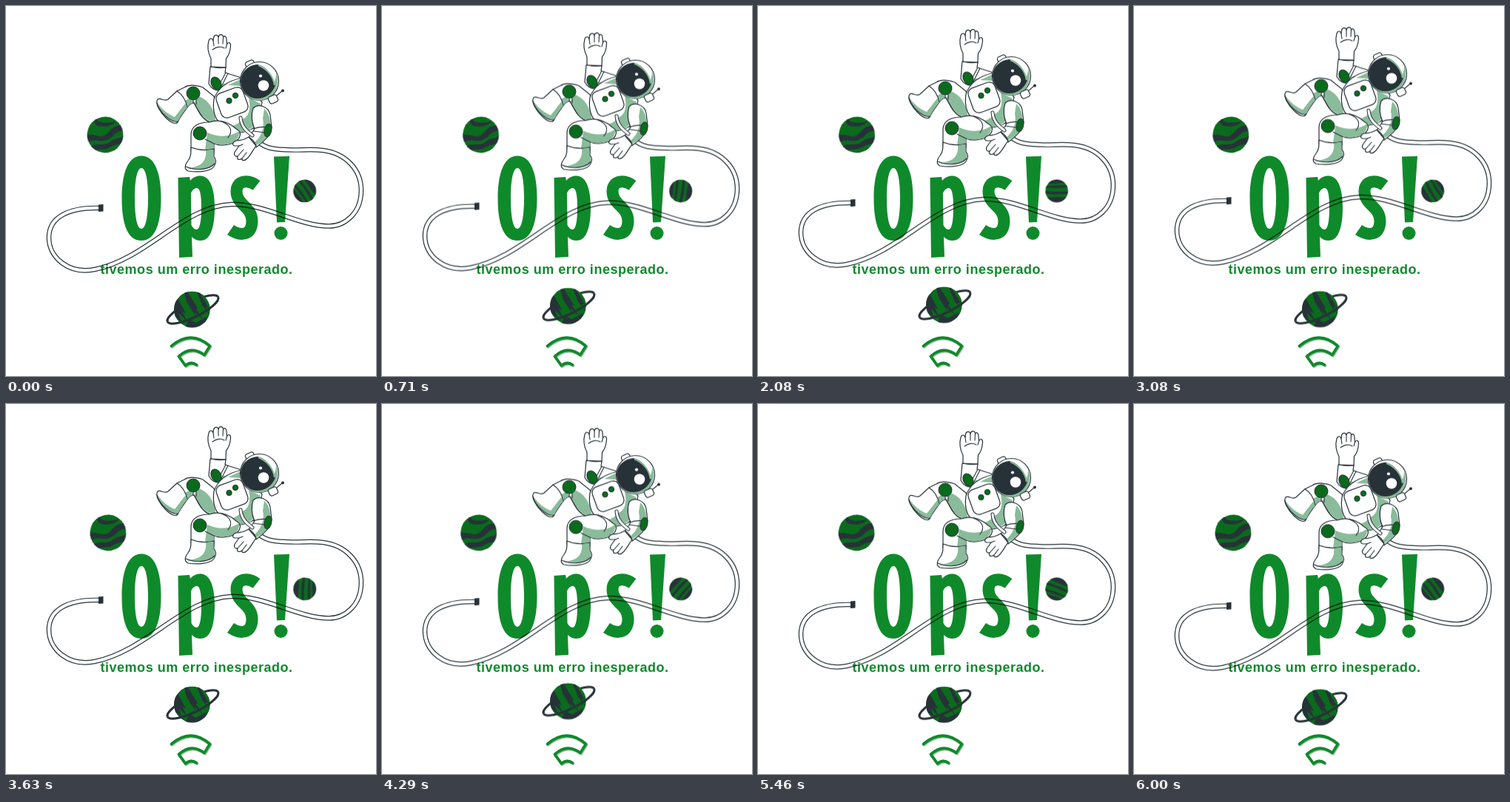
An HTML page that plays this animation: 500x500 px, repeating every 6.04 s.

```html
<!DOCTYPE html>
<html lang="pt">
<head>
<meta charset="utf-8">
<title>Ops!</title>
<style>
  html, body { margin: 0; width: 100%; height: 100%; overflow: hidden; background: #fff; }
  svg { display: block; width: 100vw; height: 100vh; background: #fff; }
  :root { --ink: #263238; --green: #0f8a2b; --deep: #0b6b1d; --shade: #8abb9a; --loop: 6040ms; }

  .float { animation: float var(--loop) linear infinite; }
  .bob { animation: float calc(var(--loop) / 2) linear infinite; }
  .spin { animation: spin var(--loop) linear infinite; }
  .shake { animation: shake var(--loop) linear infinite; }
  .blend { mix-blend-mode: multiply; }

  @keyframes float { 50% { transform: translateY(-10px); } }
  @keyframes spin { to { transform: rotate(360deg); } }
  @keyframes shake {
    10%, 90% { transform: translateX(-1px); }
    20%, 80% { transform: translateX(2px); }
    30%, 50%, 70% { transform: translateX(-4px); }
    40%, 60% { transform: translateX(4px); }
  }

  .suit { fill: #fff; stroke: var(--ink); stroke-width: 1.2; stroke-linejoin: round; stroke-linecap: round; }
  .line { fill: none; stroke: var(--ink); stroke-width: 1.1; stroke-linecap: round; stroke-linejoin: round; }
  .shade { fill: var(--shade); }
  .ink { fill: var(--ink); }
  .deep { fill: var(--deep); }
  .joint { fill: var(--deep); stroke: var(--ink); stroke-width: 1; }
  .title { fill: var(--green); }
  .ring { fill: none; stroke: var(--ink); stroke-width: 3.2; }
  .note { fill: var(--green); font: bold 18px "Liberation Sans", Arial, sans-serif; letter-spacing: .52px; }
</style>
</head>
<body>
<svg viewBox="0 0 500 500">
  <defs>
    <clipPath id="disc"><circle r="24.5"/></clipPath>
    <clipPath id="moon"><circle r="15.5"/></clipPath>
    <path id="hose" fill="none" d="M340 183C352 193 362 194 385 194.500C400 195 412 193 428 195C460 199 480 222 480 249C480 280 458 297.500 436 297.500C395 297 350 267 305 268C240 270 190 342 120 356C85 363 58 340 58 313C58 285 85 272 126 273"/>
    <path id="signal" fill="none" stroke-linejoin="round" stroke-linecap="round" d="M223.500 459.500Q250 437 275.500 459.500L268 471.500Q250 458 233.500 473.500L242.500 486Q250 479.500 257.500 485"/>
  </defs>

  <!-- lettering -->
  <g class="title" role="img" aria-label="Ops!">
    <path fill-rule="evenodd" d="M183 202.500C202 202.500 209.500 228 209.500 259C209.500 293 202 317 183 317C164 317 156.500 294 156.500 260C156.500 228 164 202.500 183 202.500ZM183 219C177 219 174 236 174 260C174 284 177 301 183 301C189 301 192 284 192 259C192 236 189 219 183 219Z"/>
    <path fill-rule="evenodd" d="M232.500 232L248 231L249 236C253 231 258 229.500 263 229.500C276 230 282 247 282 272C282 300 276 317 263 317C258 317 254 315 251 312L252 339L234 340ZM250 253L250.500 296C253 301 256 302 258 302C262 301 264 290 264 273C264 255 262 246 258 246C255 246 252 248 250 253Z"/>
    <path d="M338.500 242.500C328 234.500 311.500 235 311.500 250.500C311.500 269 332.500 271 332.500 290.500C332.500 311 316 311 303.500 302.500" fill="none" stroke="var(--green)" stroke-width="16"/>
    <path d="M362 203.500L383 203L377 292L366 292.500Z"/>
    <circle cx="371.500" cy="307" r="9"/>
  </g>
  <text class="note" x="127.500" y="361.500">tivemos um erro inesperado.</text>

  <!-- signal -->
  <use href="#signal" x="1" y="1.200" stroke="#9dbda5" stroke-width="3.800"/>
  <use href="#signal" stroke="var(--green)" stroke-width="3.800"/>

  <!-- striped planet -->
  <g transform="translate(134 174)">
    <g class="shake">
      <g clip-path="url(#disc)" transform="rotate(-20)">
        <circle class="deep" r="24.500"/>
        <path class="ink" d="M-4 -25C-3 -17 6 -14 20 -12C12 -7 3 -10 -4 -14C-9 -17 -8 -22 -6 -25Z"/>
        <path class="ink" d="M-26 -8C-13 -9 -9 4 2 0C11 -4 14 -8 26 -4L25 3C14 0 11 6 3 7C-9 10 -14 -2 -26 2Z"/>
        <path class="ink" d="M-26 8C-14 5 -8 15 4 11C13 8 16 13 25 9L22 18C13 20 10 16 2 18C-9 21 -14 13 -26 16Z"/>
      </g>
    </g>
  </g>

  <!-- small spinning planet -->
  <g transform="translate(403.700 250)">
    <g class="spin" clip-path="url(#moon)">
      <g transform="rotate(55)">
        <circle class="deep" r="15.500"/>
        <path class="ink" d="M-16 -16H16V-9L3 -8L-16 -9ZM-16 -4L4 -4.500L16 -3V0L-2 -1L-16 -1ZM-16 5L0 4L16 5V7L-16 8ZM-16 11L6 10L16 11V16H-16Z"/>
      </g>
    </g>
  </g>

  <!-- ringed planet -->
  <g class="bob">
    <g transform="translate(251.500 410)">
      <path class="ring" transform="translate(1 0) rotate(-26)" d="M-38 0A38 10.500 0 0 1 38 0"/>
      <g clip-path="url(#disc)">
        <circle class="deep" r="24.500"/>
        <path class="ink" d="M-26 -12L-19 -14L-8 6L-13 3L-7 16L-18 5L-14 17L-26 8ZM-11 -24L-7 -25L8 -1L5 -1L15 14L3 3L6 11L-7 -9ZM6 -24L10 -23L22 -3L18 -2L25 9L14 -5ZM-10 26L-4 13L5 18L20 10L16 26Z"/>
      </g>
      <path class="ring" transform="translate(1 0) rotate(-26)" d="M-38 0A38 10.500 0 0 0 38 0"/>
    </g>
  </g>

  <!-- hose -->
  <g class="float blend">
    <use href="#hose" stroke="var(--ink)" stroke-width="6.600"/>
    <use href="#hose" stroke="#fff" stroke-width="4.200"/>
    <path class="ink" d="M125 268.500L131.500 268V277.500L125 278Z"/>
  </g>

  <!-- astronaut -->
  <g class="float">
    <!-- raised arm -->
    <path class="suit" d="M276 82L274 105C277 111 283 115 290 114L308 116L318 97L296 90L297 83Z"/>
    <path class="shade" d="M289 113L294 105L308 105L306 115Z"/>
    <path class="line" d="M297 90L288 107M300 91L291 109"/>
    <ellipse class="joint" cx="284" cy="104.500" rx="6.500" ry="9" transform="rotate(-30 284 104.500)"/>
    <path class="suit" d="M277 82L277 71C273 63 272 54 274 47C275 43 279 43 280 47L280.500 43C281 38.500 286 38 287 42C288 37.500 293 37.500 293.500 42C295 39.500 298 41 298 45L298.500 52C300 48 304 49 303.500 54C303 61 301 67 297.500 71L297 83Z"/>
    <path class="line" d="M280 47L281 54M287 42L287 51M293.500 42L293 51M298.500 52L297 57M279 59C284 55 291 54 295 57M277 82Q287 85 297 83"/>

    <!-- far leg -->
    <path class="suit" d="M231 115L241 110C247 106 257 107 266 110L281 122L290 158C277 162 266 153 260 142L254 131C250 131 247 134 245 137Z"/>
    <path class="shade" d="M260 122C272 126 281 136 284 158C274 157 266 151 261 142L255 131ZM240 129L248 125L254 130C250 131 247 134 245 137Z"/>
    <path class="line" d="M254 131L261 143C266 153 277 161 288 158M253 126V131M257 126V133"/>
    <path class="suit" d="M231 115L219 126C214 130 209 123 205 126C201 132 208 143 216 151C224 159 231 161 233 155C236 149 240 144 245 137C243 128 238 119 231 115Z"/>
    <path class="shade" d="M205 131C211 141 221 147 228 150L242 132L245 137C239 144 236 149 233 155C226 160 207 143 205 131Z"/>
    <path class="line" d="M204 131C208 145 224 158 232 156"/>
    <circle class="joint" cx="253" cy="118" r="9"/>

    <!-- torso -->
    <path class="suit" d="M281 126C286 111 300 101 319 97L346 130L340 159C331 172 306 176 296 163C286 158 278 147 281 126Z"/>
    <path class="shade" d="M319 153C329 150 331 137 328 124L344 132L335 162C325 172 309 173 299 164C307 162 314 160 319 153ZM300 107L317 99L318 108Z"/>
    <rect class="suit" x="-19" y="-17.500" width="38" height="35" rx="8" transform="translate(305.500 130.500) rotate(-20)"/>
    <circle class="joint" cx="301.500" cy="128" r="3.700"/>
    <circle class="joint" cx="310" cy="121" r="3.700"/>

    <!-- near leg -->
    <path class="suit" d="M250 196L250 174C250 162 261 157 275 157C290 152 303 159 311 166C322 172 315 184 301 187C293 189 286 188 281 186L281 198Z"/>
    <path class="shade" d="M272 171C287 178 303 177 315 169C316 181 306 186 297 187C290 188 285 187 281 186V196H269Z"/>
    <path class="line" d="M291 156C304 161 307 169 300 178M269 180L281 186"/>
    <path class="suit" d="M250 191Q265 197 281 193L281 204C284 207 284 212 281 217C276 224 258 225 246 223C240 220 242 214 246 209C250 204 250 199 250 191Z"/>
    <path class="shade" d="M270 195L280 194L280 204C283 208 283 212 280 216C272 222 255 222 245 219C259 218 272 213 270 195Z"/>
    <path class="line" d="M243 217C254 222 272 223 282 213"/>
    <circle class="joint" cx="262" cy="172" r="9"/>

    <!-- hanging arm -->
    <path class="suit" d="M334 138C341 131 355 136 357 147L359 164C357 177 347 184 338 191L326 181L336 166C332 158 331 147 334 138Z"/>
    <path class="shade" d="M349 139C357 146 357 156 358 165C355 177 347 183 339 188L335 185C345 177 350 165 347 152Z"/>
    <path class="line" d="M334 166Q344 162 355 164M334 169L349 171"/>
    <ellipse class="joint" cx="354" cy="168" rx="4.800" ry="9" transform="rotate(12 354 168)"/>
    <path class="suit" d="M328 177L338 189C334 194 331 201 326 206C322 210 318 209 319 206C315 209 311 207 313 203C309 204 307 200 310 196L315 189L309 189C305 188 306 184 311 182C318 182 323 180 328 177Z"/>
    <path class="line" d="M319 206L325 198M313 203L321 194M315 189L320 187M328 177Q335 181 338 189"/>
    <path class="line" d="M317 151C318 163 325 169 333 175" style="stroke-width:5"/>
    <path d="M317 151C318 163 325 169 333 175" fill="none" stroke="#fff" stroke-width="3" stroke-linecap="round"/>

    <!-- helmet -->
    <rect class="suit" x="-6" y="-5" width="12" height="10" rx="3" transform="translate(330 79) rotate(-25)"/>
    <circle class="suit" cx="342.500" cy="101.500" r="26"/>
    <path class="shade" d="M365 90C370 104 366 119 353 125C343 130 332 127 326 121C346 125 365 113 365 90Z"/>
    <path class="ink" d="M317 100C318 88 328 80 339 79C350 80 360 92 364 107C360 119 349 126 338 125C326 124 317 114 317 100Z"/>
    <path d="M341 80C353 85 361 95 363 107" fill="none" stroke="var(--shade)" stroke-width="2.200"/>
    <circle cx="348" cy="107.500" r="7.300" fill="#fff"/>
    <circle cx="344" cy="94.500" r="2.100" fill="#fff"/>
    <rect class="suit" x="-6" y="-5" width="12" height="10" rx="3" transform="translate(361 126) rotate(-25)"/>
    <path class="line" d="M366 121L373 115"/>
    <circle class="ink" cx="374" cy="114.500" r="2"/>
  </g>
</svg>
</body>
</html>
```
